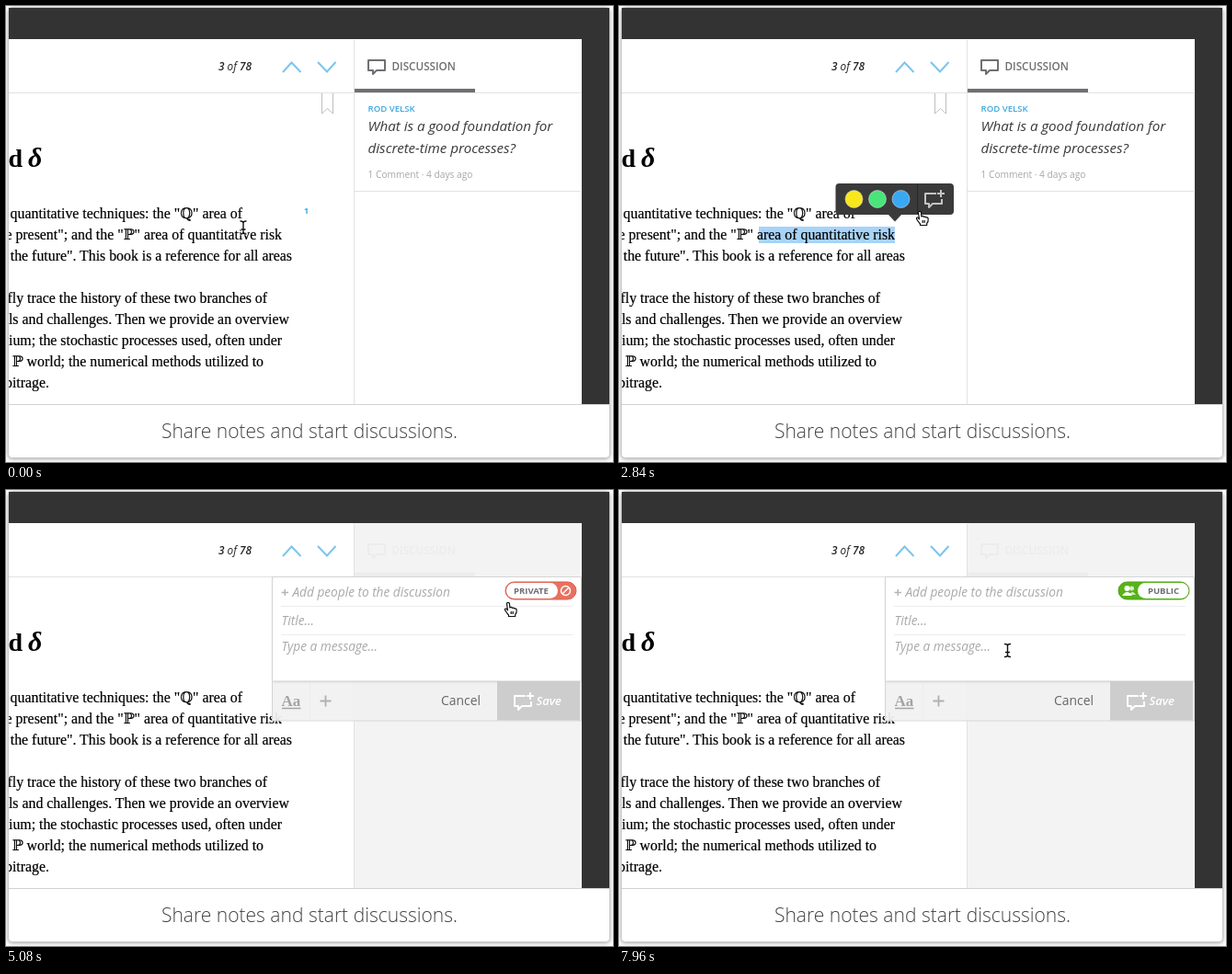
Animation of 660 by 496 pixels, one loop 8000 ms. Source, as an HTML page:

```html
<!DOCTYPE html>
<html lang="en">
<head>
<meta charset="utf-8">
<title>Share notes and start discussions</title>
<style>
  html, body { margin: 0; width: 100%; height: 100%; overflow: hidden; background: #fff; }
  svg { display: block; width: 660px; height: 496px; font-family: "Open Sans", sans-serif; }
  .card { fill: #fff; stroke: #c9c9c9; filter: drop-shadow(0 1px 2px rgba(0,0,0,.35)); }
  .sheet { fill: #fff; filter: drop-shadow(0 1px 1px rgba(0,0,0,.18)); }
  .body { font: 15.85px "Liberation Serif", "DejaVu Serif", serif; text-anchor: end; fill: #000; stroke: #000; stroke-width: .2; }
  .hint { font-style: italic; font-size: 13.7px; fill: #a9a9a9; }
  .pill { font-weight: 700; font-size: 9.5px; fill: #6d6d73; }
  .line { fill: none; stroke: #e2e2e2; }
  .faint { fill: none; stroke: #ececec; }
</style>
</head>
<body>
<svg viewBox="0 0 660 496">
  <defs>
    <clipPath id="view"><rect x="3" y="2" width="653" height="431"/></clipPath>
    <clipPath id="toggleClip"><rect x="543" y="100" width="77" height="19" rx="9.5"/></clipPath>
    <path id="bubble" d="M1 1H19V12H10L6 16V12H1Z" fill="none" stroke-width="2" stroke-linejoin="round"/>
    <path id="bubblePlus" d="M13 3H1V14H5V18L9 14H19V9M18 -1V7M14 3H22" fill="none" stroke-width="2" stroke-linejoin="round"/>
    <path id="beamShape" d="M-3-7Q0-7 0-5V5Q0 7-3 7M3-7Q0-7 0-5M3 7Q0 7 0 5M-2 2H2"/>
  </defs>

  <rect class="card" x="2.5" y="1.5" width="654" height="490" rx="4"/>
  <g clip-path="url(#view)">
    <rect x="3" y="2" width="653" height="431" fill="#333"/>
    <rect x="3" y="36" width="623" height="397" fill="#fff"/>

    <!-- Document -->
    <path class="line" d="M3 94.500H625"/>
    <text x="231" y="70" font-size="11.800" font-style="italic" font-weight="600" fill="#222">3 <tspan font-weight="400">of</tspan> 78</text>
    <path d="M301 72L310.500 61.500L320.500 72M339 61L349 71.500L358.500 61" fill="none" stroke="#7cc5ec" stroke-width="2"/>
    <path d="M343.500 95V117L349.500 111.500L355.500 117V95" fill="none" stroke="#bdbdbd"/>
    <g font-family="Liberation Serif, serif" font-weight="700" fill="#000">
      <text x="18" y="175" text-anchor="end" font-size="28">and</text>
      <text x="24" y="175" font-style="italic" font-size="30">δ</text>
    </g>
    <rect id="selection" x="152" y="240" width="0" height="18" fill="#a8d3f8"/>
    <g class="body" id="prose"></g>

    <!-- Discussion sidebar -->
    <use href="#bubble" x="393" y="58" stroke="#6f6f73"/>
    <text x="419.500" y="70" font-size="11.700" font-weight="600" fill="#6f6f73">DISCUSSION</text>
    <rect x="378" y="90" width="132" height="4" fill="#6f6f73"/>
    <text x="393.500" y="115" font-size="9.600" font-weight="600" fill="#3ba7df">ROD VELSK</text>
    <g font-size="15.200" font-style="italic" fill="#3a3a3a">
      <text x="393.500" y="136">What is a good foundation for</text>
      <text x="393.500" y="160">discrete-time processes?</text>
    </g>
    <text x="393.500" y="187" font-size="10.200" fill="#a6a6a6">1 Comment · 4 days ago</text>
    <path class="line" d="M378 201.500H625"/>
    <rect id="veil" x="378" y="36" width="248" height="397" fill="#f3f3f3"/>
    <path class="line" d="M378.500 37V433"/>

    <!-- New note form -->
    <g id="form">
      <rect x="289.500" y="95" width="336" height="156" fill="#f2f2f2" fill-opacity=".93" stroke="#d8d8d8"/>
      <rect class="sheet" x="290" y="95" width="335" height="112.500"/>
      <path class="faint" d="M299 126.500H616M299 157.500H616M330.500 209V251"/>
      <path d="M289.500 251V94.500H625" fill="none" stroke="#d4d4d4"/>
      <path d="M299.500 111.500H307M303.250 108V115" stroke="#b5b5b5" stroke-width="1.500"/>
      <g class="hint">
        <text x="311.500" y="116">Add people to the discussion</text>
        <text x="299.500" y="147">Title...</text>
        <text x="299.500" y="175">Type a message...</text>
      </g>
      <text x="299.500" y="235" font-family="Liberation Serif, serif" font-weight="700" font-size="17" fill="#a4a4a4">Aa</text>
      <path d="M300 237.500H320.500" stroke="#a4a4a4" stroke-width="1.500"/>
      <path d="M341.500 229.500H353.500M347.500 223.500V235.500" stroke="#b0b0b0" stroke-width="1.800"/>
      <text x="473" y="234" font-size="13.900" fill="#66666a">Cancel</text>
      <rect x="534" y="208" width="90" height="42.500" fill="#cdcdcd"/>
      <use href="#bubblePlus" x="552" y="221" stroke="#fff"/>
      <text x="576.500" y="234" font-size="13" font-style="italic" font-weight="600" fill="#fff">Save</text>

      <g clip-path="url(#toggleClip)">
        <rect x="543" y="100" width="77" height="19" fill="#e9705f"/>
        <g fill="none" stroke="#fff" stroke-width="1.500"><circle cx="608.500" cy="109.500" r="5"/><path d="M605 113L612 106"/></g>
        <g id="green">
          <rect x="543" y="100" width="77" height="19" fill="#58b317"/>
          <g fill="#fff">
            <circle cx="557.500" cy="107" r="2.500" opacity=".75"/>
            <path d="M555 114Q558 108 562 114Z" opacity=".75"/>
            <circle cx="552.500" cy="107" r="3"/>
            <path d="M547 115Q552.500 107 558 115Z"/>
          </g>
        </g>
        <g id="knob">
          <rect x="544" y="101" width="56" height="17" rx="8.500" fill="#fff"/>
          <text class="pill" id="privateLabel" x="571" y="113" text-anchor="middle">PRIVATE</text>
          <text class="pill" id="publicLabel" x="572" y="113" text-anchor="middle">PUBLIC</text>
        </g>
      </g>
      <rect id="toggleEdge" x="543" y="100" width="77" height="19" rx="9.500" fill="none"/>
      <path id="caret" d="M300 161V179" stroke="#555"/>
    </g>
    <text id="noteNumber" x="324" y="226" font-size="9" font-weight="700" fill="#3ba7df">1</text>

    <!-- Highlight menu -->
    <g id="menu">
      <path d="M292 226H308L300 234.500Z" fill="#3a3a3a"/>
      <rect x="235.500" y="193" width="128.500" height="34" rx="4" fill="#3a3a3a"/>
      <g stroke="#e8e8e8" stroke-opacity=".5">
        <circle cx="255.500" cy="210" r="9.500" fill="#f8e71c"/>
        <circle cx="281" cy="210" r="9.500" fill="#4ae57a"/>
        <circle cx="306.500" cy="210" r="9.500" fill="#39a8f2"/>
      </g>
      <path d="M324.500 194V226" stroke="#292929"/>
      <use href="#bubblePlus" x="332" y="201" stroke="#c4c4c4"/>
    </g>

    <!-- Pointer -->
    <g id="pointer">
      <g id="beam" fill="none" stroke-linecap="round">
        <use href="#beamShape" stroke="#fff" stroke-width="3" opacity=".8"/>
        <use href="#beamShape" stroke="#111" stroke-width="1.400"/>
      </g>
      <path id="hand" d="M-4.500-6.200Q-4.500-7.700-3-7.700Q-1.600-7.700-1.500-6.200L-1.200-2Q.5-3.500 1.400-1.600Q3-2.600 3.800-.9Q5.900-1.600 6.200.6Q6.500 4 4.700 5.500V7.500H-2.500V6Q-5.500 2.500-6.500.5Q-6.800-1.300-5-.9L-3.500.8ZM.2 2V5M2.200 2V5" fill="#fff" stroke="#111" stroke-width="1.200" stroke-linejoin="round"/>
    </g>
  </g>

  <path d="M3 433.500H656" stroke="#d2d2d2"/>
  <text x="330" y="470" text-anchor="middle" font-size="21.050" font-weight="300" fill="#444">Share notes and start discussions.</text>
</svg>
<script>
const LOOP = 8000;
const $ = id => document.getElementById(id);
const set = (id, attr, value) => $(id).setAttribute(attr, value);
const show = (id, on) => set(id, "visibility", on ? "visible" : "hidden");
const fade = (id, amount) => set(id, "opacity", amount);
const progress = (t, from, to) => Math.min(1, Math.max(0, (t - from) / (to - from)));
const smooth = p => p * p * (3 - 2 * p);
const within = (t, from, to) => t >= from && t < to;

// Right edge, baseline and words of each line; the left side is cut by the window.
const prose = [
  [257, 231, 'quantitative techniques: the "ℚ" area of'],
  [300, 254, 'the present"; and the "ℙ" area of quantitative risk'],
  [311, 277, 'the future". This book is a reference for all areas'],
  [284, 323, 'briefly trace the history of these two branches of'],
  [308, 346, 'models and challenges. Then we provide an overview'],
  [300, 369, 'premium; the stochastic processes used, often under'],
  [280, 392, 'the ℙ world; the numerical methods utilized to'],
  [47, 415, 'arbitrage.'],
];
$("prose").innerHTML = prose.map(([x, y, words]) => `<text x="${x}" y="${y}">${words}</text>`).join("");

// Pointer stops: time, x, y.
const stops = [
  [0, 258, 241], [100, 258, 241], [760, 152, 249], [900, 152, 249], [1680, 301, 249],
  [2300, 301, 249], [2840, 330, 231], [3250, 345, 217], [3950, 345, 217], [5000, 549, 130],
  [5300, 549, 130], [5700, 560, 130], [6850, 560, 130], [7440, 422.5, 174.5], [LOOP, 422.5, 174.5],
];

function pointerAt(t) {
  const i = stops.findIndex(stop => stop[0] > t);
  const [t0, x0, y0] = stops[i - 1], [t1, x1, y1] = stops[i];
  const p = smooth(progress(t, t0, t1));
  return [x0 + (x1 - x0) * p, y0 + (y1 - y0) * p];
}

function render(t) {
  const [x, y] = pointerAt(t);
  const hand = within(t, 2600, 4220) || within(t, 4840, 6980);
  set("pointer", "transform", `translate(${x} ${y})`);
  show("hand", hand);
  show("beam", !hand);

  const selected = t < 3460 ? 148 * smooth(progress(t - 52, 900, 1680)) : 0;
  set("selection", "width", selected);
  fade("menu", t < 3460 ? progress(t, 1800, 1920) : 0);

  fade("veil", .95 * progress(t, 3480, 3760));
  fade("form", progress(t, 3600, 3960));
  show("noteNumber", t < 3900);

  const isPublic = smooth(progress(t, 5820, 6020));
  set("knob", "transform", `translate(${20 * isPublic} 0)`);
  fade("green", isPublic);
  fade("privateLabel", 1 - isPublic);
  fade("publicLabel", isPublic);
  set("toggleEdge", "stroke", isPublic < .5 ? "#dc5f4d" : "#4fa51a");

  const blinking = within(t, 3550, 5820) && (t - 3550) % 1000 < 500;
  show("caret", blinking || within(t, 7460, 7900));
}

function tick() {
  render(performance.now() % LOOP);
  requestAnimationFrame(tick);
}
tick();
</script>
</body>
</html>
```
